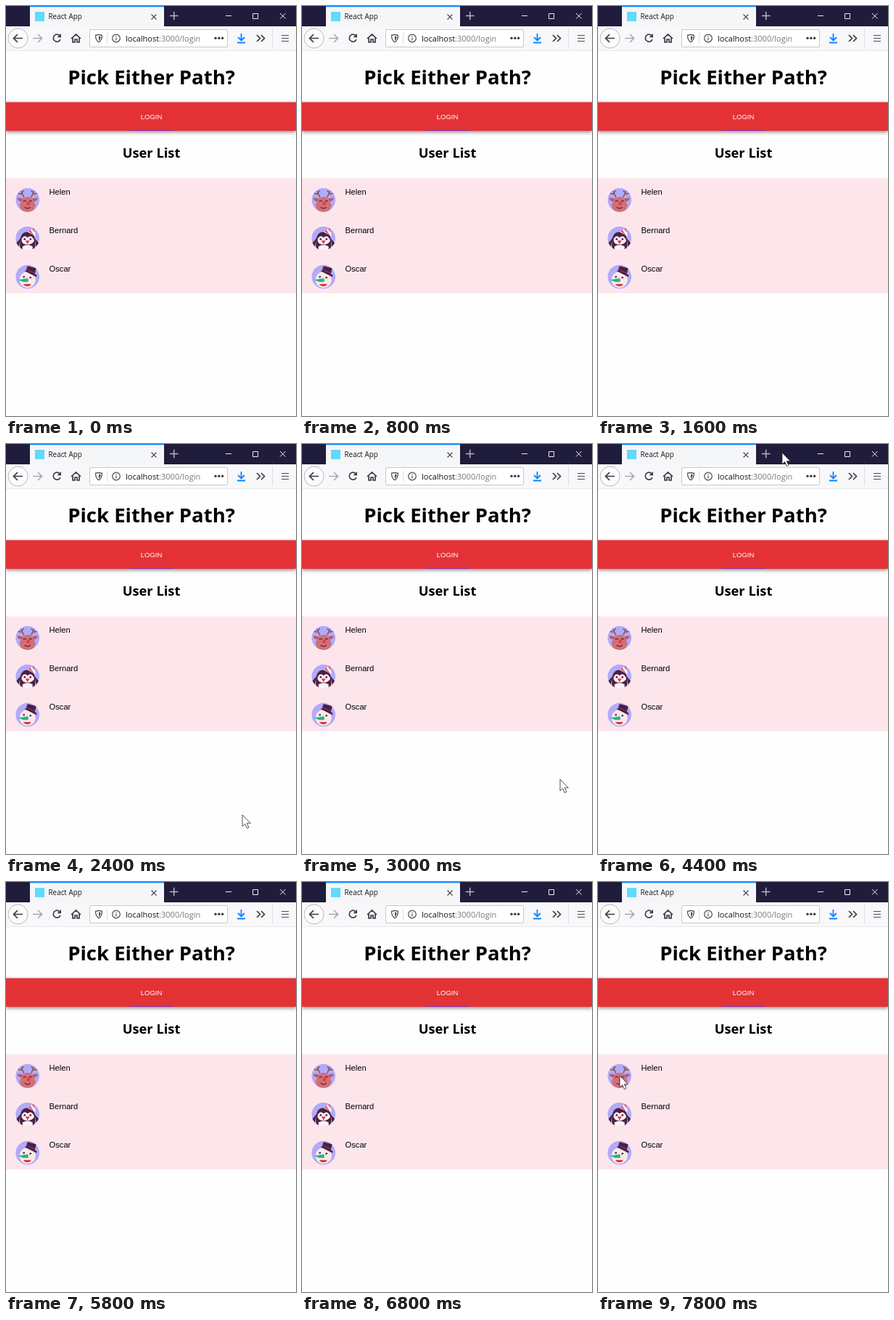
Write an HTML page that moves like this. It is 400 px wide and 565 px high and loops after 8 s.

```html
<!DOCTYPE html>
<html lang="en">
<head>
<meta charset="utf-8">
<title>React App</title>
<style>
  html, body { margin: 0; width: 100%; height: 100%; overflow: hidden; background: #fefefe; }
  svg { display: block; width: 100%; height: 100%; }
  .ui { font-family: "Open Sans", "Noto Sans", sans-serif; }
  .heading { font-weight: 700; text-anchor: middle; }
  .list { font: 11.2px "Liberation Sans", Arial, sans-serif; }
  .line { fill: none; stroke: #3b3b40; stroke-width: 1.7; }
  .thin { fill: none; stroke: #4c4c52; stroke-width: 1.2; }
  .faded { stroke: #aaaaae; }
</style>
</head>
<body>
<svg viewBox="0 0 400 565">
  <defs>
    <filter id="shadow" x="-5%" y="-40%" width="110%" height="190%">
      <feDropShadow dx="0" dy="2" stdDeviation="2.8" flood-opacity=".45"/>
    </filter>
    <clipPath id="disc"><circle r="16.5"/></clipPath>
  </defs>

  <!-- Window and tab -->
  <rect width="400" height="28" fill="#201c3c"/>
  <rect x="33" width="185" height="28" fill="#f5f6f7"/>
  <rect x="33" width="185" height="1.3" fill="#0a84ff"/>
  <rect x="40" y="8" width="13" height="13" fill="#61dafb"/>
  <text class="ui" x="58.5" y="18.4" font-size="9.9" fill="#18181c">React App</text>
  <path d="M200.500 11.500l7 7m0-7l-7 7" class="thin"/>
  <path d="M226 13.500h11.500M231.700 7.800v11.500" fill="none" stroke="#b5b4c0" stroke-width="1.5"/>
  <path d="M303 13.500h8M340.500 10.500h7v7h-7zM378 10l7.500 7.500m0-7.500l-7.500 7.500" fill="none" stroke="#eee"/>

  <!-- Toolbar -->
  <rect y="28" width="400" height="33" fill="#f8f8fa"/>
  <rect y="61" width="400" height="1" fill="#e8e8ea"/>
  <circle cx="16.500" cy="44.500" r="13.500" fill="#fcfcfd" stroke="#b9b9be"/>
  <path class="line" d="M23 44.500H11M16 39l-5.500 5.500L16 50"/>
  <path class="line faded" d="M37 44.500h12M44 39l5.500 5.500L44 50"/>
  <path class="line" d="M74.300 41.200a5 5 0 1 0 .6 4.900"/>
  <path d="M76 38v5.300h-5.300z" fill="#3b3b40"/>
  <path class="line" d="M90 45l6.500-6 6.500 6M92 44v6h3v-4h3v4h3v-6"/>
  <rect x="115.500" y="32.500" width="190" height="24" rx="1.500" fill="#fff" stroke="#c9c9ce"/>
  <path class="thin" d="M128 39.300l4.500 1c0 5-1 7.500-4.500 9.500-3.500-2-4.500-4.500-4.500-9.500z"/>
  <path d="M128 41.500l2.500.6c0 3-.6 4.500-2.500 5.700z" fill="#4c4c52"/>
  <path d="M139.500 37v15M367.500 31v27" stroke="#dedee2"/>
  <circle class="thin" cx="152" cy="44.500" r="5.300"/>
  <path class="thin" d="M152 43.500v4M152 41v1.300"/>
  <text class="ui" x="165" y="49" font-size="11" fill="#151518">localhost<tspan fill="#77777c">:3000/login</tspan></text>
  <g fill="#3b3b40"><circle cx="289" cy="44.300" r="1.700"/><circle cx="293.800" cy="44.300" r="1.700"/><circle cx="298.600" cy="44.300" r="1.700"/></g>
  <path d="M324.500 38v9M320 43l4.500 4.500 4.500-4.500M319 50.500h11" fill="none" stroke="#0a84ff" stroke-width="1.800"/>
  <path class="line" d="M346 40l4.500 4.500L346 49M352 40l4.500 4.500L352 49"/>
  <path class="thin" d="M380 40.500h10M380 44.500h10M380 48.500h10"/>

  <!-- Page -->
  <text class="ui heading" x="200.500" y="107.800" font-size="27.500">Pick Either Path?</text>
  <rect y="132.500" width="400" height="39.500" fill="#e33036" filter="url(#shadow)"/>
  <rect x="171" y="171" width="60" height="1" fill="#a0239c"/>
  <text x="200.500" y="156" font-family="Liberation Sans, Arial, sans-serif" font-size="9.500" text-anchor="middle" fill="#fff">LOGIN</text>
  <text class="ui heading" x="200.500" y="208.800" font-size="18.300">User List</text>
  <rect y="237.500" width="400" height="158.500" fill="#fde6eb"/>
  <g class="list">
    <text x="59.500" y="260">Helen</text>
    <text x="59.500" y="313">Bernard</text>
    <text x="59.500" y="366">Oscar</text>
  </g>

  <!-- Reindeer -->
  <g transform="translate(29.700 267.300)" clip-path="url(#disc)">
    <circle r="16.500" fill="#b2aafa"/>
    <path d="M-5-4l-4-8M-8-8l-5-1M-8-10l3-3M5-4l4-8M8-8l5-1M8-10l-3-3" fill="none" stroke="#85515a" stroke-width="1.500"/>
    <path d="M-7-2l-7-1q0 5 6 5zM7-2l7-1q0 5-6 5z" fill="#b75c66"/>
    <path d="M-7-2Q0-7 7-2L11 7Q10 17 0 17T-11 7z" fill="#d07075"/>
    <path d="M-6 2q2-2 4 0M2 2q2-2 4 0M-4 10q4 3 8 0" fill="none" stroke="#55283e" stroke-width="1.200"/>
    <circle cx="1" cy="5" r="2.300" fill="#ee2f48"/>
  </g>

  <!-- Penguin -->
  <g transform="translate(29.700 320.200)" clip-path="url(#disc)">
    <circle r="16.500" fill="#b2aafa"/>
    <path d="M-10 15Q-13-9 0-9T10 15zM-10 0l-6 7 4 5zM10 0l6 7-4 5z" fill="#4b2142"/>
    <path d="M0-1Q-4-5-7-1T-6 7Q0 10 6 7T7-1Q4-5 0-1zM-7 11Q0 7 7 11V17H-7z" fill="#fff2f4"/>
    <circle cx="-4" cy="1" r="1.300" fill="#35172f"/><circle cx="4" cy="1" r="1.300" fill="#35172f"/>
    <path d="M-3 3h6L0 8z" fill="#ef2d53"/>
    <path d="M0-9L9-15 11-3z" fill="#fff"/>
    <path d="M1-10l3-2 5 8-3-2zM6-13l3-2 1 7z" fill="#e95b7e"/>
  </g>

  <!-- Snowman -->
  <g transform="translate(29.700 373.200)" clip-path="url(#disc)">
    <circle r="16.500" fill="#b2aafa"/>
    <circle cy="4" r="11" fill="#fbe9e6"/>
    <path d="M-2-9L0-15 12-12 10-4 13-2 12 0-4-8z" fill="#482042"/>
    <path d="M-1-10L10-5" stroke="#8b315c" stroke-width="1.300"/>
    <circle cx="-5" cy="0" r="1.200" fill="#3c1e35"/><circle cx="4" cy="1" r="1.200" fill="#3c1e35"/>
    <path d="M-13 4L1 2V7H-6z" fill="#22b58f"/>
    <path d="M-6 10H5Q4 13 0 13T-6 10z" fill="#d92640"/>
  </g>

  <path id="cursor" d="M0 0V16l3.700-3.400 2.600 6 2.600-1.100-2.600-5.800h5z" fill="#fff" stroke="#26262c" stroke-width=".8" visibility="hidden"/>
</svg>
<script>
  const LOOP = 8000, STEP = 200;
  const cursor = document.getElementById("cursor");

  // Each visit of the pointer: [time, x, y] waypoints.
  const visits = [
    [[2200, 322, 529], [2400, 326, 511], [3000, 356, 462], [3400, 374, 436],
     [3800, 374, 436], [4000, 362, 392], [4400, 254, 12], [4800, 251, -6]],
    [[7600, 72, 190], [7800, 30, 267]]
  ];

  function positionAt(t) {
    const path = visits.find(v => t >= v[0][0] && t <= v[v.length - 1][0]);
    if (!path) return null;
    const next = Math.max(1, path.findIndex(point => point[0] >= t));
    const [t0, x0, y0] = path[next - 1], [t1, x1, y1] = path[next];
    const k = (t - t0) / (t1 - t0);
    return [x0 + (x1 - x0) * k, y0 + (y1 - y0) * k];
  }

  function draw() {
    const t = Math.floor(performance.now() % LOOP / STEP) * STEP;
    const position = positionAt(t);
    cursor.setAttribute("visibility", position ? "visible" : "hidden");
    if (position) cursor.setAttribute("transform", `translate(${position})`);
    requestAnimationFrame(draw);
  }
  draw();
</script>
</body>
</html>
```
